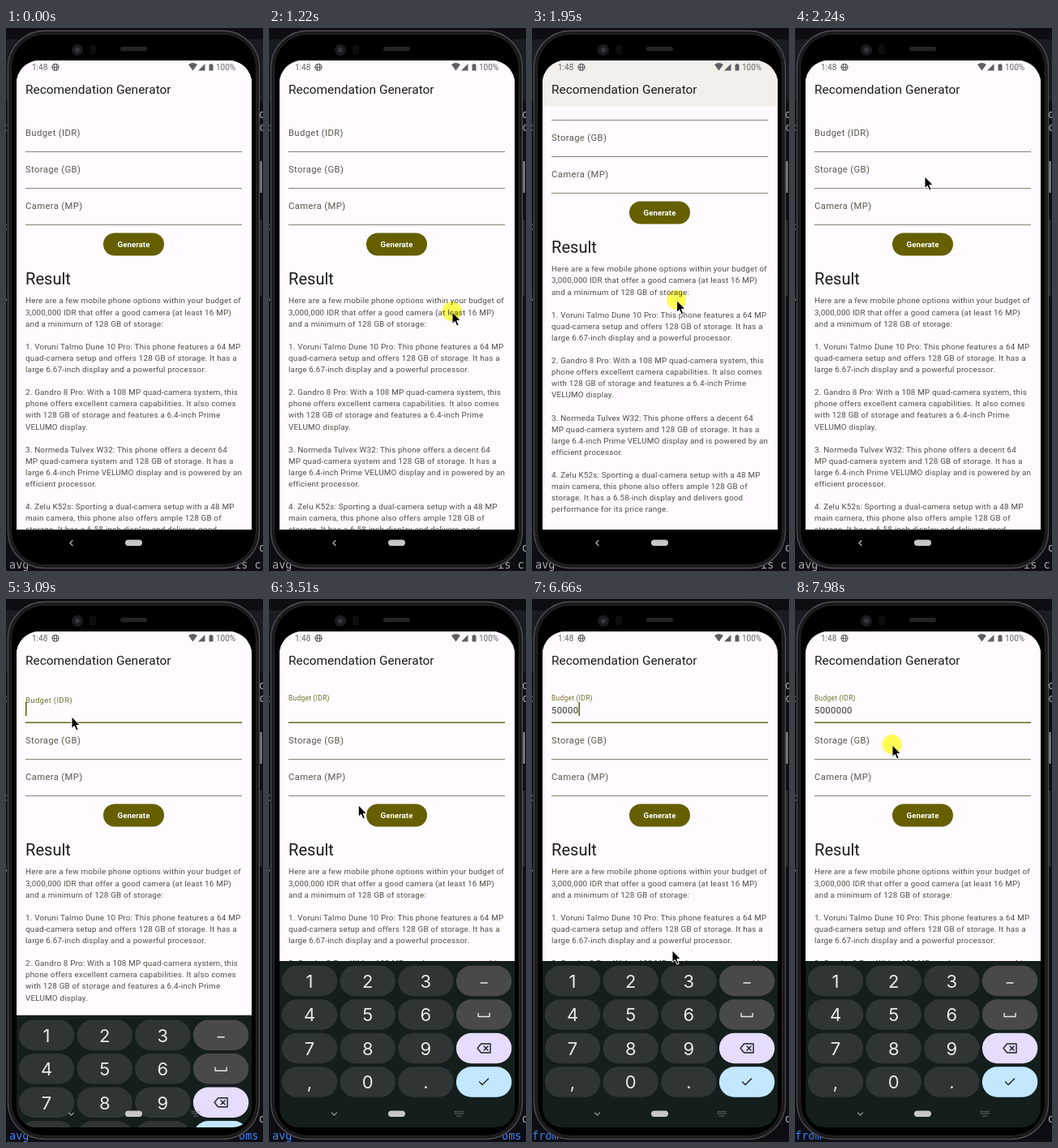
An HTML page for the animation above (8000 ms loop, 317 by 669 pixels).

```html
<!DOCTYPE html>
<html lang="en">
<head>
<meta charset="utf-8">
<title>Recomendation Generator</title>
<style>
  html, body { margin: 0; width: 100%; height: 100%; overflow: hidden; background: #0d0d13; }
  svg { display: block; width: 100vw; height: 100vh; font-family: Roboto, sans-serif; }
  .mono { font: 13.5px "DejaVu Sans Mono", monospace; white-space: pre; }
  .label { font-size: 11.28px; letter-spacing: .35px; fill: #5a584d; }
  .body { font-size: 9.87px; letter-spacing: .186px; fill: #504e46; }
  .status { font-size: 10px; fill: #66646a; }
  .key { font: 22px Inter, sans-serif; fill: #e6eae8; text-anchor: middle; }
  .line { fill: none; stroke-linecap: round; stroke-linejoin: round; }
</style>
</head>
<body>
<svg viewBox="0 0 317 669">
  <defs>
    <clipPath id="screen"><path d="M13 68a28 28 0 0 1 28-28H275a28 28 0 0 1 28 28V627a24 24 0 0 1-24 24H37a24 24 0 0 1-24-24Z"/></clipPath>
    <clipPath id="app"><path d="M13 40H303V618H13Z"/></clipPath>
  </defs>

  <!-- desktop behind the phone -->
  <rect width="317" height="669" fill="#0d0d13"/>
  <path d="M0 14H317V90H0Z" fill="#1b1b24"/>
  <g class="mono" fill="#a9a9b0">
    <text x="-6" y="127">c</text><text x="-6" y="249">c</text><text x="-6" y="337">s</text>
    <text x="312" y="111">o</text><text x="312" y="127">c</text><text x="312" y="645">o</text>
  </g>
  <text id="deskLeft" class="mono" y="666"></text>
  <text id="deskRight" class="mono" y="666"></text>

  <!-- phone body -->
  <path d="M314.500 164V203" stroke="#9a9a9c" stroke-width="2"/>
  <path d="M314 236V330" stroke="#2e2e31" stroke-width="3"/>
  <rect x="2.500" y="3.500" width="310" height="662" rx="45" fill="#19191b" stroke="#4d4d51" stroke-width="1.300"/>
  <rect x="6.500" y="7.500" width="302" height="654" rx="41" fill="#000" stroke="#29292b"/>
  <circle cx="88" cy="27" r="7" fill="#1c1c1f"/><circle cx="88" cy="27" r="3" fill="#36363c"/>
  <rect x="103" y="20" width="8" height="13" rx="4" fill="#0d0d0f"/>
  <rect x="141" y="23" width="33" height="5.500" rx="2.700" fill="#242426"/>

  <g clip-path="url(#screen)">
    <g clip-path="url(#app)">
      <rect x="13" y="40" width="290" height="578" fill="#fffbff"/>
      <g id="content">
        <g id="fields"></g>
        <path id="focus" d="M24 152.200H291" stroke="#6b6518" stroke-width="1.400"/>
        <text id="amount" class="label" x="24" y="140.500" style="fill:#34332d"></text>
        <rect id="caret" y="127" width="1.500" height="17" fill="#655f00"/>
        <rect x="120" y="252.500" width="75" height="28" rx="14" fill="#655f00"/>
        <text x="157.500" y="270" text-anchor="middle" font-size="9.600" font-weight="700" letter-spacing=".07" fill="#fff">Generate</text>
        <text x="24" y="316" font-size="20.100" fill="#1d1b1e">Result</text>
        <g id="result" class="body"></g>
      </g>
      <rect x="13" y="40" width="290" height="56.400" fill="#fffbff"/>
      <rect id="tint" x="13" y="40" width="290" height="56.400" fill="#f2eee9"/>
      <text x="24" y="81" font-size="15.450" fill="#1d1b1e">Recomendation Generator</text>
      <text class="status" x="32" y="52">1:48</text>
      <text class="status" x="259" y="52">100%</text>
      <g fill="#605e63">
        <path d="M225 45Q230.500 41 236 45L230.500 52.500ZM245.500 44V52.500H237ZM250.500 45H252V44H254V45H255.500V52.500H250.500Z"/>
        <path class="line" d="M57 48.500H65M59.500 45V52M62.500 45V52" stroke="#605e63"/>
        <circle cx="61" cy="48.300" r="4" fill="none" stroke="#605e63" stroke-width="1.200"/>
      </g>
    </g>
    <g id="keyboard"></g>
    <rect x="147" y="630.500" width="21" height="7.500" rx="3.700" fill="#c6c7c7"/>
    <path id="back" class="line" d="M82 631.500L79 634.500L82 637.500" stroke="#b5b5b5" stroke-width="1.300"/>
    <g id="navIme" class="line" stroke="#8d9492">
      <path d="M77.500 633L80.500 636L83.500 633" stroke-width="1.300"/>
      <path d="M229 631.500H239.500M229 634H239.500M231.500 637H237" stroke-width="1.700" stroke-dasharray="1 1.400" stroke-linecap="butt"/>
    </g>
  </g>

  <g id="pointer">
    <path d="M0 0V14.500L3.300 11.500L5.700 17L8.200 16L5.800 10.600H10.300Z" fill="#000" stroke="#fff" stroke-width="1"/>
    <circle id="press" cx="-.5" cy="-1" r="12" fill="#ffff55" style="mix-blend-mode:multiply"/>
  </g>
</svg>
<script>
const LOOP = 8000;
const el = id => document.getElementById(id);
const show = (id, on) => el(id).setAttribute('visibility', on ? 'visible' : 'hidden');
const move = (id, x, y, extra = '') => el(id).setAttribute('transform', `translate(${x} ${y}) ${extra}`);
const clamp = v => Math.max(0, Math.min(1, v));
const within = (t, spans) => spans.some(([from, to]) => t >= from && t < to);

// Smooth interpolation over rows of [time, ...values]
function at(keys, t) {
  const i = keys.findIndex(k => k[0] > t);
  if (i === 0) return keys[0].slice(1);
  if (i < 0) return keys[keys.length - 1].slice(1);
  const a = keys[i - 1], b = keys[i];
  const p = (t - a[0]) / (b[0] - a[0]), s = p * p * (3 - 2 * p);
  return a.slice(1).map((v, n) => v + (b[n + 1] - v) * s);
}

const RESULT = `Here are a few mobile phone options within your budget of
3,000,000 IDR that offer a good camera (at least 16 MP)
and a minimum of 128 GB of storage:

1. Voruni Talmo Dune 10 Pro: This phone features a 64 MP
quad-camera setup and offers 128 GB of storage. It has a
large 6.67-inch display and a powerful processor.

2. Gandro 8 Pro: With a 108 MP quad-camera system, this
phone offers excellent camera capabilities. It also comes
with 128 GB of storage and features a 6.4-inch Prime
VELUMO display.

3. Normeda Tulvex W32: This phone offers a decent 64
MP quad-camera system and 128 GB of storage. It has a
large 6.4-inch Prime VELUMO display and is powered by an
efficient processor.

4. Zelu K52s: Sporting a dual-camera setup with a 48 MP
main camera, this phone also offers ample 128 GB of
storage. It has a 6.58-inch display and delivers good
performance for its price range.

5. Dabu H74: With a 48 MP quad-camera system, this
phone provides good camera capabilities. It offers 128 GB
of storage and features a 6.43-inch VELUMO display.

Remember to check the latest prices and availability in
your local market before making a purchase, as prices
may vary.`;

el('result').innerHTML = RESULT.split('\n')
  .map((line, i) => `<text x="24" y="${339.4 + 14.1 * i}">${line}</text>`).join('');

el('fields').innerHTML = ['Budget (IDR)', 'Storage (GB)', 'Camera (MP)'].map((name, i) =>
  `<text id="label${i}" class="label" transform="translate(24 ${133.3 + 45 * i})">${name}</text>
   <path d="M24 ${152.5 + 45 * i}H291" stroke="#7b7768" stroke-width=".9"/>`).join('');

const ICONS = {
  minus: 'M-4 2.500H4',
  space: 'M-7 -1.500V2.500H7V-1.500',
  erase: 'M-8 0L-3.500 -5.500H8V5.500H-3.500ZM0 -2.500L5 2.500M5 -2.500L0 2.500',
  done: 'M-5.500 0L-2 3.500L5.500 -4'
};
const KEYS = ['1', '2', '3', 'minus', '4', '5', '6', 'space', '7', '8', '9', 'erase', ',', '0', '.', 'done'];
const FILLS = { erase: '#e6dcfc', done: '#c2e7ff' };

el('keyboard').innerHTML = '<rect x="13" y="446" width="290" height="210" fill="#141e1c"/>' +
  KEYS.map((key, i) => {
    const col = i % 4, x = 50 + 71.7 * col, y = 470.5 + 41.5 * (i >> 2);
    const fill = FILLS[key] || (col === 3 ? '#47494b' : '#2e3534');
    const ink = FILLS[key] ? '#1d2428' : '#e6eae8';
    const face = ICONS[key]
      ? `<path class="line" d="${ICONS[key]}" stroke="${ink}" stroke-width="1.400"/>`
      : `<text class="key" y="8.300">${key}</text>`;
    return `<g transform="translate(${x} ${y})">
      <rect x="-34.200" y="-18.700" width="68.400" height="37.400" rx="18.700" fill="${fill}"/>${face}</g>`;
  }).join('');

const POINTER = [
  [400, -12, 136], [1170, 226, 350], [1240, 226, 350], [1500, 200, 190], [1560, 198, 190],
  [1690, 185, 238], [1730, 185, 238], [2000, 178, 345], [2040, 178, 345], [2230, 160, 183],
  [2300, 160, 183], [2850, 81, 145], [3120, 81, 145], [3700, 120, 290], [4310, 173, 433],
  [7500, 173, 433], [7930, 120, 180]
];
const PRESSED = [[1220, 1520], [1660, 2020], [2880, 2990], [7960, LOOP]];
const SCROLL = [[1250, 0], [1560, 145], [1740, 145], [2060, 0]];
const TINT = [[1260, 0], [1430, 1], [2050, 1], [2220, 0]];
const CARET = [[3010, 3220], [3720, 4220], [4720, 5230], [5690, 7590]];
const TYPED = [5690, 5860, 6030, 6200, 6660, 6870, 7060];
const FOCUS = 3010;

// Desktop text peeking out: time, colour, left x and text, right x and text
const DESK = [
  [0, '#a9a9b0', 4, 'avg', 282, 'is c'], [2600, '#3f83f5', 4, 'avg', 287, 'oms'],
  [3750, '#3f83f5', 4, 'avg', 297, 'cou'], [5230, '#3f83f5', 0, 'from', 0, '']
];

function draw(t) {
  move('pointer', ...at(POINTER, t));
  show('press', within(t, PRESSED));
  move('content', 0, -at(SCROLL, t)[0]);
  el('tint').setAttribute('opacity', at(TINT, t)[0]);

  const focused = t >= FOCUS;
  const float = at([[FOCUS, 0], [FOCUS + 145, 1]], t)[0];
  move('label0', 24, 133.3 - 8.8 * float, `scale(${1 - .25 * float})`);
  el('label0').style.fill = focused ? '#756f2a' : '';
  show('focus', focused);

  const digits = TYPED.filter(time => t >= time).length;
  el('amount').textContent = '5000000'.slice(0, digits);
  el('caret').setAttribute('x', 24 + 6.69 * digits);
  show('caret', within(t, CARET));

  const rise = 1 - (1 - clamp((t - 3000) / 285)) ** 2.46;
  move('keyboard', 0, 172 * (1 - rise));
  show('keyboard', t >= 3000);
  show('navIme', t >= 3000);
  show('back', t < 3000);

  const [, color, leftX, left, rightX, right] = DESK.filter(d => t >= d[0]).pop();
  for (const [id, x, text] of [['deskLeft', leftX, left], ['deskRight', rightX, right]]) {
    el(id).textContent = text;
    el(id).setAttribute('x', x);
    el(id).style.fill = color;
  }
}

function frame() {
  draw(performance.now() % LOOP);
  requestAnimationFrame(frame);
}
frame();
</script>
</body>
</html>
```
